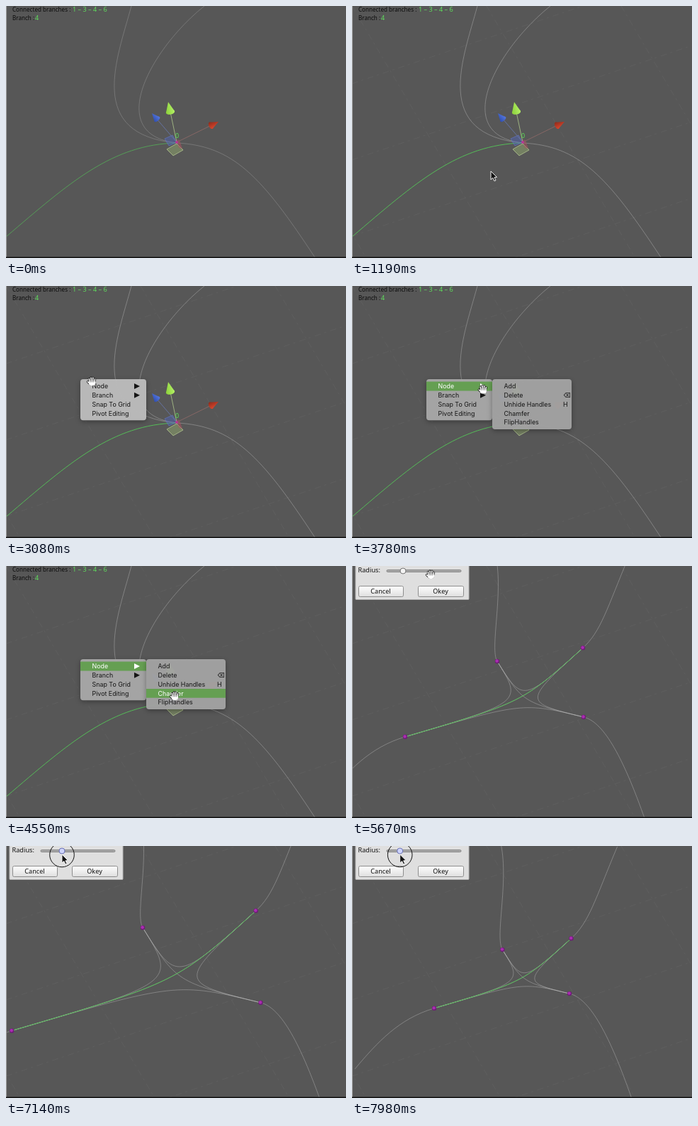
An HTML page with a canvas for the animation above (8 s loop, 480 by 357 pixels).

```html
<!DOCTYPE html>
<html lang="en">
<head>
<meta charset="utf-8">
<title>Branch chamfer</title>
<style>
html, body { margin: 0; width: 100%; height: 100%; overflow: hidden; background: #575757; }
canvas { display: block; }
</style>
</head>
<body>
<canvas id="stage" width="480" height="357"></canvas>
<script>
const ctx = document.getElementById('stage').getContext('2d');
const LOOP = 8000, STEP = 70, ROW = 12.8;
const UI = '"Noto Sans", "Open Sans", sans-serif', MENU = 'Inter, Roboto, sans-serif';
const GREEN = '#55bd58', PALE = 'rgba(196,196,196,.4)';
const HUB = [241, 193];

// arm: hub to node; grow: spread per slider unit; bend, end: tail offsets from the node
const BRANCHES = [
  { arm: [-166, 49], grow: .0575, bend: [-80, 48], end: [-112, 86] },
  { arm: [-36, -58], grow: .0475, bend: [9, -95], end: [-2, -149] },
  { arm: [85, -77], grow: .045, bend: [34, -56], end: [65, -130] },
  { arm: [86, 21], grow: .054, bend: [53, 48], end: [88, 149] }
];

const POINTER = [
  { at: 1190, x: 196, y: 234 },
  { at: 1750, x: 105, y: 131 },
  { at: 2940, x: 105, y: 131 },
  { at: 3080, x: 121, y: 135 },
  { at: 3710, x: 180, y: 143 },
  { at: 4550, x: 238, y: 184 },
  { at: 5390, x: 146, y: 16 },
  { at: 5670, x: 111, y: 12 },
  { at: 6090, x: 72, y: 12 }
];

const ramp = (t, from, to) => Math.min(1, Math.max(0, (t - from) / (to - from)));
const add = (a, b, k = 1) => [a[0] + b[0] * k, a[1] + b[1] * k];
const sliderAt = t => 72 + 7 * ramp(t, 6440, 7070) - 11.3 * ramp(t, 7210, 7980);

function pointerAt(t) {
  let { x, y } = POINTER[0];
  for (let i = 1; i < POINTER.length; i++) {
    const a = POINTER[i - 1], b = POINTER[i], u = ramp(t, a.at, b.at);
    x += (b.x - a.x) * u;
    y += (b.y - a.y) * u;
  }
  return [x + sliderAt(t) - 72, y];
}

function stroke(color, width = 1) {
  ctx.strokeStyle = color;
  ctx.lineWidth = width;
  ctx.stroke();
}

function poly(points, fill, line, width) {
  ctx.beginPath();
  points.forEach(p => ctx.lineTo(...p));
  if (fill) { ctx.closePath(); ctx.fillStyle = fill; ctx.fill(); }
  if (line) stroke(line, width);
}

function bezier(a, b, c, d, color) {
  ctx.beginPath();
  ctx.moveTo(...a);
  ctx.bezierCurveTo(...b, ...c, ...d);
  stroke(color);
}

function disc(x, y, r, fill, line) {
  ctx.beginPath();
  ctx.arc(x, y, r, 0, 7);
  if (fill) { ctx.fillStyle = fill; ctx.fill(); }
  if (line) stroke(line);
}

function box(x, y, w, h, r, fill, line) {
  ctx.beginPath();
  ctx.roundRect(x, y, w, h, r);
  ctx.fillStyle = fill;
  ctx.fill();
  if (line) stroke(line);
}

function text(s, x, y, color, size, family) {
  ctx.font = size + 'px ' + family;
  ctx.fillStyle = color;
  ctx.fillText(s, x, y);
}

function shade(a, b, from, to) {
  const g = ctx.createLinearGradient(...a, ...b);
  g.addColorStop(0, from);
  g.addColorStop(1, to);
  return g;
}

function grid(alpha) {
  ctx.globalAlpha = alpha;
  ctx.setLineDash([9, 5, 3, 6]);
  const line = 'rgba(130,130,130,.18)';
  for (let i = 0; i < 5; i++) {
    poly([[0, 110 + i * 108], [480, -52 + i * 108]], null, line);
    poly([[-190 + i * 190, 0], [20 + i * 190, 357]], null, line);
  }
  ctx.setLineDash([]);
  ctx.globalAlpha = 1;
}

function quad(corner, u, v, fill, line) {
  poly([corner, add(corner, u), add(add(corner, u), v), add(corner, v)], fill, line);
}

function axis(tip, length, light, dark, line) {
  const a = Math.atan2(HUB[1] - tip[1], HUB[0] - tip[0]), r = length * .43;
  const base = add(tip, [Math.cos(a), Math.sin(a)], length), side = [-Math.sin(a), Math.cos(a)];
  const left = add(base, side, r), right = add(base, side, -r);
  poly([HUB, base], null, line);
  const fill = shade(left, right, light, dark);
  poly([tip, left, right], fill);
  ctx.beginPath();
  ctx.ellipse(...base, r * .55, r, a, 0, 7);
  ctx.fill();
}

function gizmo() {
  quad(HUB, [-6, -10], [-11, 5], 'rgba(80,100,180,.5)', 'rgba(100,120,205,.6)');
  quad([241, 195], [9, 9], [-14, 8], 'rgba(135,155,105,.6)', '#a3b386');
  quad([240, 189], [5, 1], [4, 12], 'rgba(175,80,95,.5)');
  axis([206, 152], 11, '#2f4eb0', '#5577dd', '#6572a0');
  axis([300, 164], 12, '#8e2c1c', '#d8452c', '#866765');
  axis([229, 136], 14.5, '#8bd03a', '#b4f066', '#9db181');
  disc(...HUB, 2, '#b93794');
  text('0', 239, 187, '#5be058', 9, UI);
}

function junction(t) {
  const hub = [241, 194];
  ctx.globalAlpha = .7 + .3 * ramp(t, 0, 770);
  bezier([177, 0], [157, 75], [112, 182], hub, PALE);
  bezier([280, 0], [205, 60], [137, 182], hub, PALE);
  bezier([436, 356], [360, 240], [320, 198], hub, PALE);
  bezier([0, 327], [90, 250], [150, 196], hub, GREEN);
  ctx.globalAlpha = 1;
  gizmo();
}

function chamfer(s) {
  const nodes = BRANCHES.map(({ arm, grow, bend, end }) => {
    const node = add(HUB, arm, 1 + grow * (s - 72));
    bezier(node, add(node, arm, .3), add(node, bend), add(node, end), PALE);
    return node;
  });
  nodes.forEach((a, i) => nodes.slice(i + 1).forEach(b => bezier(a, HUB, HUB, b, PALE)));
  bezier(nodes[0], HUB, HUB, nodes[2], GREEN);
  for (const [x, y] of nodes) {
    disc(x, y, 3.2, '#6d1c76');
    disc(x - .4, y - .5, 2.2, '#ab2db2');
  }
}

function heading() {
  text('Connected branches :', 9, 8, '#0c0c0c', 8.1, UI);
  text('1 – 3 – 4 – 6', 94, 8, '#5fdc5c', 9.1, UI);
  text('Branch :', 9, 20, '#0c0c0c', 8.1, UI);
  text('4', 41, 20, '#5fdc5c', 9.1, UI);
}

function triangle(x, y, color) {
  poly([[x, y - 4], [x + 8, y], [x, y + 4]], color);
}

function menu(x, w, items, chosen, fill) {
  ctx.shadowColor = 'rgba(0,0,0,.35)';
  ctx.shadowBlur = 7;
  ctx.shadowOffsetY = 2;
  box(x, 132, w, items.length * ROW + 7, 4, fill);
  ctx.shadowColor = 'transparent';
  items.forEach(([label, mark], i) => {
    const y = 142 + i * ROW, on = i === chosen, ink = on ? '#fff' : '#151515', right = x + w;
    if (on) box(x, y - ROW / 2, w, ROW, 0, '#659f52');
    text(label, x + 16.5, y + 3.2, ink, 8.9, MENU);
    if (mark === '▶') triangle(right - 17, y, ink);
    else if (mark) text(mark, right - 12, y + 3.2, ink, 8.9, MENU + ', "DejaVu Sans"');
  });
}

function menus(t, x, y) {
  const open = t >= 3430;
  ctx.globalAlpha = ramp(t, 2520, 2730) * (1 - ramp(t, 4690, 4900));
  menu(105, 93, [['Node', '▶'], ['Branch', '▶'], ['Snap To Grid'], ['Pivot Editing']],
    t >= 3220 ? 0 : -1, open ? 'rgba(168,168,168,.97)' : 'rgba(188,188,188,.97)');
  if (open) {
    const row = x > 198 ? Math.floor((y - 142) / ROW + .5) : -1;
    menu(198, 112, [['Add'], ['Delete', '⌫'], ['Unhide Handles', 'H'], ['Chamfer'], ['FlipHandles']],
      row, 'rgba(165,165,165,.95)');
  }
  ctx.globalAlpha = 1;
}

function button(x, w, label) {
  box(x + .5, 28.5, w, 15, 2, shade([0, 28], [0, 44], '#fff', '#dedede'), '#8d8d8d');
  ctx.textAlign = 'center';
  text(label, x + w / 2, 39, '#111', 9.1, UI);
  ctx.textAlign = 'left';
}

function panel(s, active) {
  box(5, -4, 160, 51.5, 1, '#dfdfdf', '#b5b5b5');
  text('Radius:', 8.5, 9, '#111', 9.2, UI);
  box(49, 5.5, 105, 3, 1.5, '#aaa', '#858585');
  disc(s, 7, 4, active ? '#cfd5fb' : '#f3f3f3', active ? '#6a72b8' : '#777');
  button(9, 63, 'Cancel');
  button(93, 64, 'Okey');
}

function arrow(x, y) {
  const tail = [[0, 0], [0, 12], [2.8, 9.4], [5, 14], [7, 13], [5, 8.8], [8.6, 8.6], [0, 0]];
  poly(tail.map(p => add(p, [x, y])), '#111', '#f0f0f0');
}

function hand(x, y) {
  ctx.lineCap = ctx.lineJoin = 'round';
  for (const [color, extra] of [['#1a1a1a', 1.6], ['#fff', 0]]) {
    box(x - 3.5, y - 1, 8, 6.5, 2, color, color);
    for (let i = 0; i < 4; i++) {
      const dx = -3.6 + i * 2.7;
      poly([[x + dx * .8, y + 1], [x + dx, y - 5.2 + (i - 1.4) ** 2 * .9]], null, color, 1.6 + extra);
    }
    poly([[x - 2, y + 4], [x - 5.6, y + .6]], null, color, 1.6 + extra);
  }
  for (let i = 0; i < 3; i++) {
    const dx = x - 2 + i * 2.4;
    poly([[dx, y - 2], [dx, y + 1]], null, '#333', .7);
  }
  ctx.lineCap = 'butt';
  ctx.lineJoin = 'miter';
}

function draw(now) {
  const t = Math.floor(now % LOOP / STEP) * STEP;
  const [x, y] = pointerAt(t), s = sliderAt(t);
  const cut = t >= 4830, pressed = t >= 6160;

  ctx.fillStyle = '#575757';
  ctx.fillRect(0, 0, 480, 357);
  grid(ramp(t, 0, 770));
  if (cut) chamfer(s); else junction(t);
  heading();
  if (cut) panel(s, pressed);
  if (t >= 2590 && t < 4900) menus(t, x, y);

  ctx.fillStyle = '#9c9c9c';
  ctx.fillRect(0, 0, 1, 356);
  ctx.fillStyle = '#111';
  ctx.fillRect(0, 355.5, 480, 1.5);

  if (pressed) disc(x, 12.5, 17.3, null, '#111');
  if (t >= 2590 && t < 6020) hand(x, y);
  else if (t >= STEP) arrow(x, y);
  requestAnimationFrame(draw);
}
requestAnimationFrame(draw);
</script>
</body>
</html>
```
